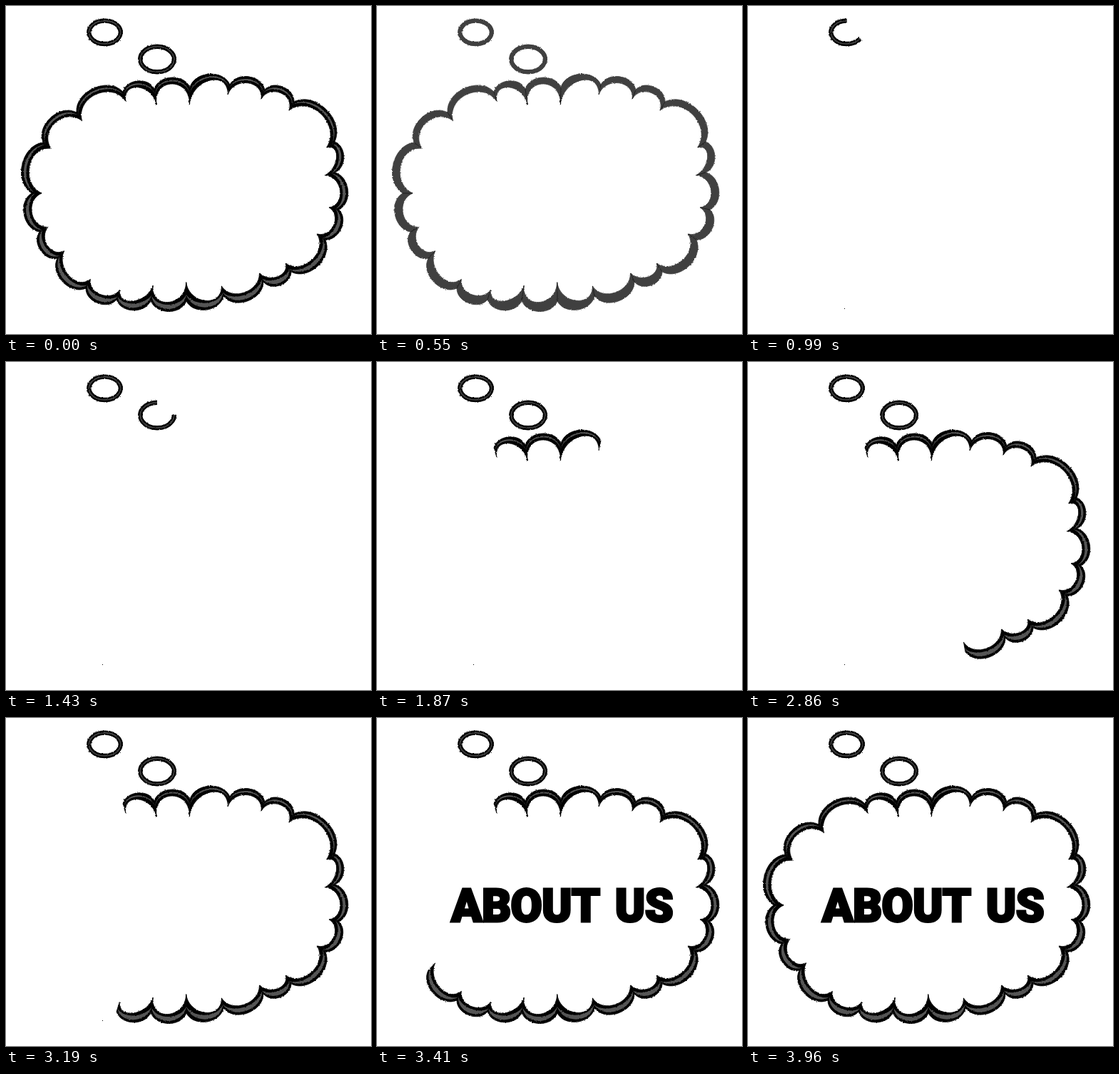
Write an HTML page that moves like this. It is 512 by 459 pixels and loops after 4.07 s.

```html
<!DOCTYPE html>
<html lang="en">
<head>
<meta charset="utf-8">
<title>About us</title>
<style>
  html, body { margin: 0; width: 100%; height: 100%; overflow: hidden; background: #fff; }
  svg { display: block; width: 100%; height: 100%; }
  .ink { fill: #000; stroke: #000; stroke-width: .8; stroke-linejoin: round; }
  .shade { fill: #555; }
  .ring { fill: none; stroke: #000; stroke-width: 6.4; }
  .glint { fill: none; stroke: #444; stroke-width: 1.6; }
  .ring, .glint { stroke-dasharray: 101 200; }
  text { font: 900 64px Roboto, "Open Sans", sans-serif; letter-spacing: -.7px;
         word-spacing: 8px; stroke: #000; stroke-width: 3px; }
</style>
</head>
<body>
<svg viewBox="0 0 512 459">
  <defs>
    <filter id="rough" filterUnits="userSpaceOnUse" x="0" y="0" width="512" height="459"
            color-interpolation-filters="sRGB">
      <feTurbulence type="fractalNoise" baseFrequency=".45" numOctaves="2" seed="4"/>
      <feDisplacementMap in="SourceGraphic" scale="2.5" xChannelSelector="R" yChannelSelector="G"/>
    </filter>
  </defs>
  <g id="art" filter="url(#rough)"></g>
  <rect id="dot" x="135" y="423" width="1" height="1"/>
  <text id="title" x="104" y="284.75">ABOUT US</text>
</svg>
<script>
const LOOP = 4070, STEP = 110, FADE_START = 550, DRAW_START = 880;
const BUBBLE_START = 1650, TITLE_START = 3410;
const art = document.getElementById('art');

// Outer notches between the scallops, clockwise from the upper left
const NOTCHES = [
  [164, 120], [208, 116], [258, 114], [314, 110], [363, 117], [404, 134],
  [461, 190], [461, 233], [467, 285], [448, 327], [400, 372], [361, 386],
  [305, 406], [253, 413], [203, 412], [155, 411], [112, 395], [72, 353],
  [47, 316], [36, 262], [52, 191], [99, 149]
];

function add(tag, attrs, parent) {
  const el = document.createElementNS('http://www.w3.org/2000/svg', tag);
  for (const key in attrs) el.setAttribute(key, attrs[key]);
  return parent.appendChild(el);
}

// Holds each value of a [time, value] table until the next time
function hold(el, prop, table) {
  const last = table[table.length - 1];
  const frames = [...table, [LOOP, last[1]]].map(([time, value]) =>
    ({ [prop]: value, offset: time / LOOP, easing: 'steps(1, end)' }));
  el.animate(frames, { duration: LOOP, iterations: Infinity });
}

// Values from one to another in equal steps, starting with the first change
const ramp = (start, count, from, to) => Array.from({ length: count }, (_, n) =>
  [start + n * STEP, from + (to - from) * (n + 1) / count]);

const fade = ramp(FADE_START, 4, 1, 0);

// Fades a part out with the rest, then brings it back; its shading goes at once
function reveal(part, shading, start) {
  hold(part, 'opacity', [[0, 1], ...fade.filter(([time]) => time < start), [start, 1]]);
  hold(shading, 'visibility', [[0, 'visible'], [FADE_START, 'hidden'], [start, 'visible']]);
}

const mix = (a, b, t) => a.map((v, i) => v + (b[i] - v) * t);
const shift = (p, dir, d) => p.map((v, i) => v + dir[i] * d);
const pt = p => p.map(v => v.toFixed(1)).join(' ');

// Inner tip of the spike at a notch; spikes are longest near the middle
function tipOf(notch) {
  const [x, y] = notch;
  const nx = (x - 250) / 529, ny = (y - 262) / 256, n = Math.hypot(nx, ny);
  const length = 14 + 16 * Math.exp(-(((x - 235) / 35) ** 2));
  return shift(notch, [nx / n, ny / n], -length);
}

// Cubic from a to b whose middle passes through the apex
function arc(a, b, apex) {
  const mid = mix(a, b, .5);
  const rise = mid.map((v, i) => apex[i] - v);
  const ratio = Math.hypot(...rise) / Math.hypot(b[0] - a[0], b[1] - a[1]);
  const pull = Math.max(-.35, .67 - 1.3 * ratio);
  const handle = p => shift(mix(p, mid, pull), rise, 4 / 3);
  return `C${pt(handle(a))} ${pt(handle(b))} ${pt(b)}`;
}

function scallop(a, b, start) {
  const tipA = tipOf(a), tipB = tipOf(b), mid = mix(a, b, .5);
  const chord = Math.hypot(b[0] - a[0], b[1] - a[1]);
  const out = [(b[1] - a[1]) / chord, (a[0] - b[0]) / chord];
  const apex = shift(mid, out, chord * .3);
  const thick = 11 + (mid[1] - 262) / 75;

  const g = add('g', {}, art);
  add('path', { class: 'ink',
    d: `M${pt(a)}${arc(a, b, apex)}L${pt(tipB)}${arc(tipB, tipA, shift(apex, out, -thick))}Z` }, g);
  const c = mix(a, tipA, .35), d = mix(b, tipB, .35);
  const shade = add('path', { class: 'shade',
    d: `M${pt(c)}${arc(c, d, shift(apex, out, -3.5))}${arc(d, c, shift(apex, out, 3.5 - thick))}Z` }, g);
  reveal(g, shade, start);
}

// Ellipse drawn counter-clockwise from its top
function ring(cx, cy, rx, ry, start, count) {
  const g = add('g', {}, art);
  const d = `M${cx} ${cy - ry}A${rx} ${ry} 0 1 0 ${cx + .1} ${cy - ry}Z`;
  const [line, glint] = ['ring', 'glint'].map(name => {
    const path = add('path', { class: name, d, pathLength: 100 }, g);
    hold(path, 'strokeDashoffset', [[0, 0], [DRAW_START - 1, 102], ...ramp(start, count, 102, 0)]);
    return path;
  });
  reveal(g, glint, start);
}

ring(138.5, 36.8, 22.2, 16.2, DRAW_START, 3);
ring(212, 74.5, 23.8, 17.8, DRAW_START + 3 * STEP, 4);
NOTCHES.forEach((notch, i) =>
  scallop(notch, NOTCHES[(i + 1) % NOTCHES.length], BUBBLE_START + i * STEP));

hold(document.getElementById('dot'), 'opacity', [[0, 0], [DRAW_START, 1], [BUBBLE_START + 15 * STEP, 0]]);
hold(document.getElementById('title'), 'opacity', [[0, 0], [TITLE_START, 1]]);
</script>
</body>
</html>
```
